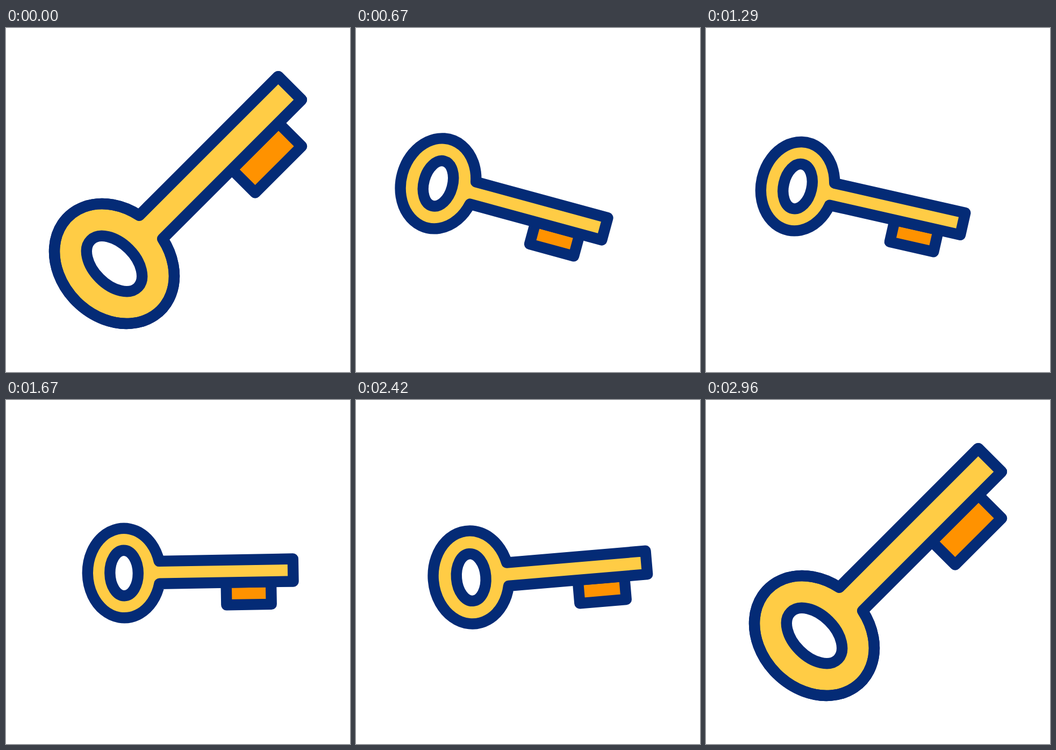
Animation of 640 by 640 pixels, one loop 3000 ms. Source, as an HTML page:

```html
<!DOCTYPE html>
<html lang="en">
<head>
<meta charset="utf-8">
<title>Key</title>
<style>
  html, body { margin: 0; height: 100%; overflow: hidden; background: #fff; }
  svg { display: block; width: 100vw; height: 100vh; }
  .line { stroke: #042b76; stroke-width: 20.4; stroke-linejoin: round; vector-effect: non-scaling-stroke; }
</style>
</head>
<body>
<svg viewBox="0 0 640 640">
  <defs>
    <clipPath id="head"><ellipse rx="99.5" ry="122.3"/></clipPath>
  </defs>
  <!-- the key lies along x, with the middle of its head at 0,0 -->
  <g id="key">
    <path class="line" fill="#ff9200" d="M278.6 30.75H401V92H278.6Z"/>
    <path id="body" fill="#ffcc45" d="M462-30.75H96.3A99.5 122.3 0 1 0 96.3 30.75H462Z"/>
    <path fill="#ff9200" clip-path="url(#head)" d="M158-84L-9 2.7L-135 126H-300V-300H158Z"/>
    <use href="#body" class="line" style="fill:none"/>
    <path class="line" fill="none" d="M462-30.75H96.3A99.5 122.3 0 1 0 96.3 30.75H462Z"/>
    <ellipse class="line" fill="#fff" rx="38.5" ry="62"/>
  </g>
</svg>
<script>
const LOOP = 3000, FRAME = 1000 / 24, PIVOT = 167.6;
const key = document.getElementById('key');

// Poses: angle, scale, x of the pivot
const rest = [-45, 1, 320];
const tilted = [17.85, 0.682, 263];
const flat = [-1, 0.681, 333.7];

// Moves: first and last frame, poses, easing handles (x1, x2), optional handles for the scale
const moves = [
  { start: 1, end: 22, from: rest, to: tilted, ease: [0.26, 0.1] },
  { start: 22, end: 39, from: tilted, to: flat, ease: [0.763, 0.66] },
  { start: 52, end: 71, from: flat, to: rest, ease: [0.8, 0.22], scaleEase: [0.79, 0.28] }
];

// Cubic bezier easing that is level at both ends
function bezier(x, [x1, x2]) {
  let lo = 0, hi = 1, s = 0.5;
  for (let i = 0; i < 30; i++) {
    s = (lo + hi) / 2;
    const bx = 3 * x1 * s * (1 - s) ** 2 + 3 * x2 * s * s * (1 - s) + s ** 3;
    if (bx < x) lo = s; else hi = s;
  }
  return s * s * (3 - 2 * s);
}

function poseAt(frame) {
  const move = moves.filter(m => m.start <= frame).pop();
  if (!move) return rest;
  const { start, end, from, to, ease, scaleEase = ease } = move;
  if (frame >= end) return to;
  const x = (frame - start) / (end - start);
  return from.map((v, i) => v + (to[i] - v) * bezier(x, i === 1 ? scaleEase : ease));
}

function draw(time) {
  const frame = Math.floor((time % LOOP + 5) / FRAME);
  const [angle, scale, x] = poseAt(frame);
  key.setAttribute('transform',
    `translate(${x} 320) rotate(${angle}) scale(${scale}) translate(${-PIVOT} 0)`);
}

function tick() {
  draw(performance.now());
  requestAnimationFrame(tick);
}

draw(0);
requestAnimationFrame(tick);
</script>
</body>
</html>
```
